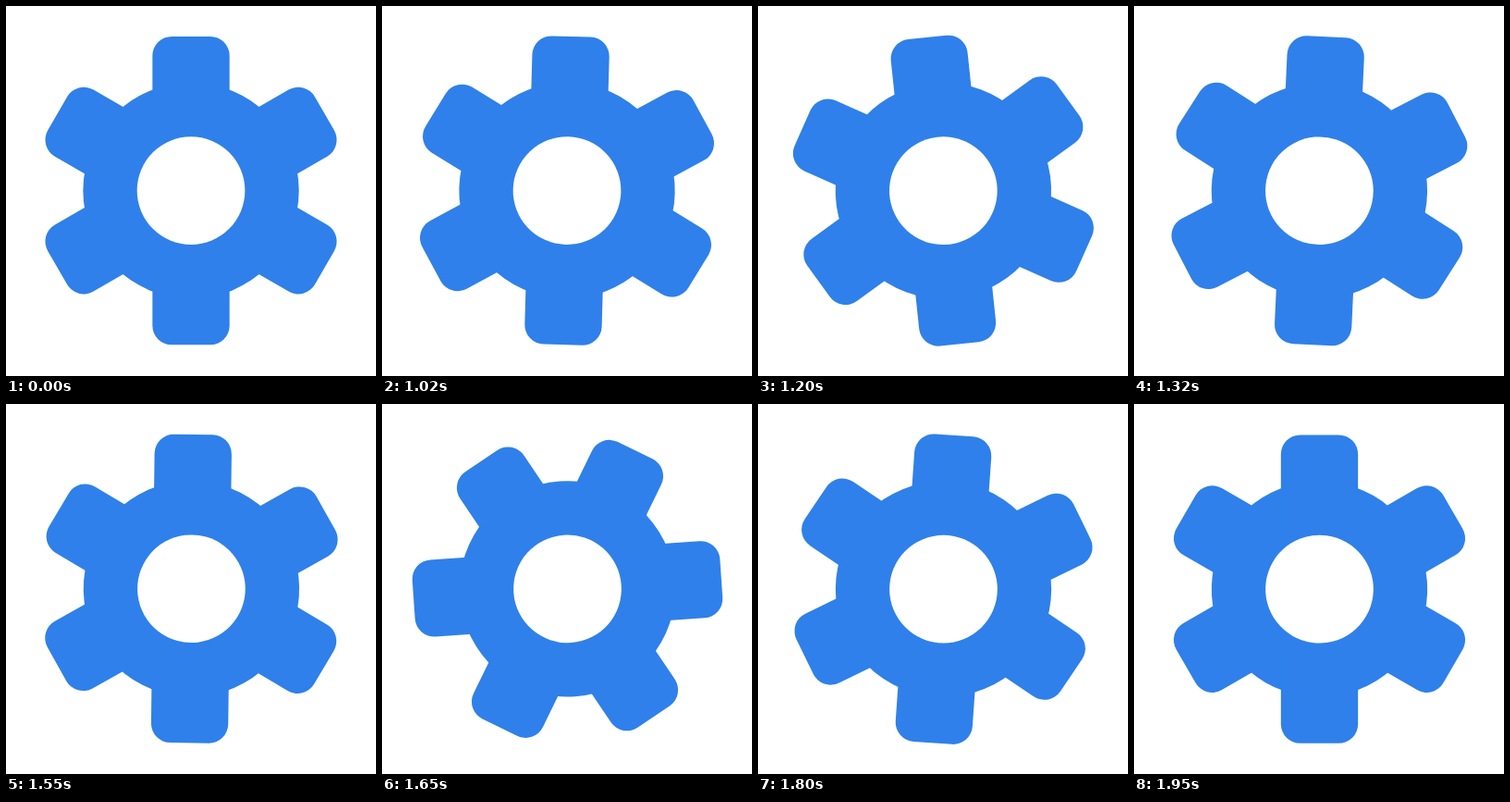
Animation of 400x400 px, one loop 2020 ms. Source, as an HTML page:

```html
<!DOCTYPE html>
<html lang="en">
<head>
<meta charset="utf-8">
<title>Turning gear</title>
<style>
  html, body { margin: 0; width: 100%; height: 100%; overflow: hidden; background: #fff; }
  svg { display: block; width: 100%; height: 100%; }
</style>
</head>
<body>
<svg viewBox="0 0 400 400">
  <g id="gear" fill="#2f80ea">
    <circle r="116.67"/>
    <rect id="bar" x="-41.67" y="-166.67" width="83.33" height="333.33" rx="20.83"/>
    <use href="#bar" transform="rotate(60)"/>
    <use href="#bar" transform="rotate(120)"/>
    <circle r="58.33" fill="#fff"/>
  </g>
</svg>
<script>
const LOOP = 2020, STEP = 60, PEAK = 64;
const SWING = 266.67, SETTLE = 150;
const STARTS = [1000, 1533.33];
const gear = document.getElementById('gear');

function ease(time, duration) {
  const u = Math.min(1, Math.max(0, time / duration));
  return u * u * (3 - 2 * u);
}

// One tooth forward, a little too far, then back into place.
function turn(time) {
  return PEAK * ease(time, SWING) - (PEAK - STEP) * ease(time - SWING, SETTLE);
}

// 40 pictures per second, shown at times cut to 10 ms.
function sample(time) {
  return Math.floor(time / 50) * 50 + (time % 50 >= 20 ? 25 : 0);
}

function draw(now) {
  const time = sample(now % LOOP);
  const angle = STARTS.reduce((sum, start) => sum + turn(time - start), 0);
  // The gear sits slightly off its pivot.
  gear.setAttribute('transform', `translate(200.1 200) rotate(${angle}) translate(-.1 -.4)`);
}

const begin = performance.now();
function tick() {
  draw(performance.now() - begin);
  requestAnimationFrame(tick);
}
tick();
</script>
</body>
</html>
```
